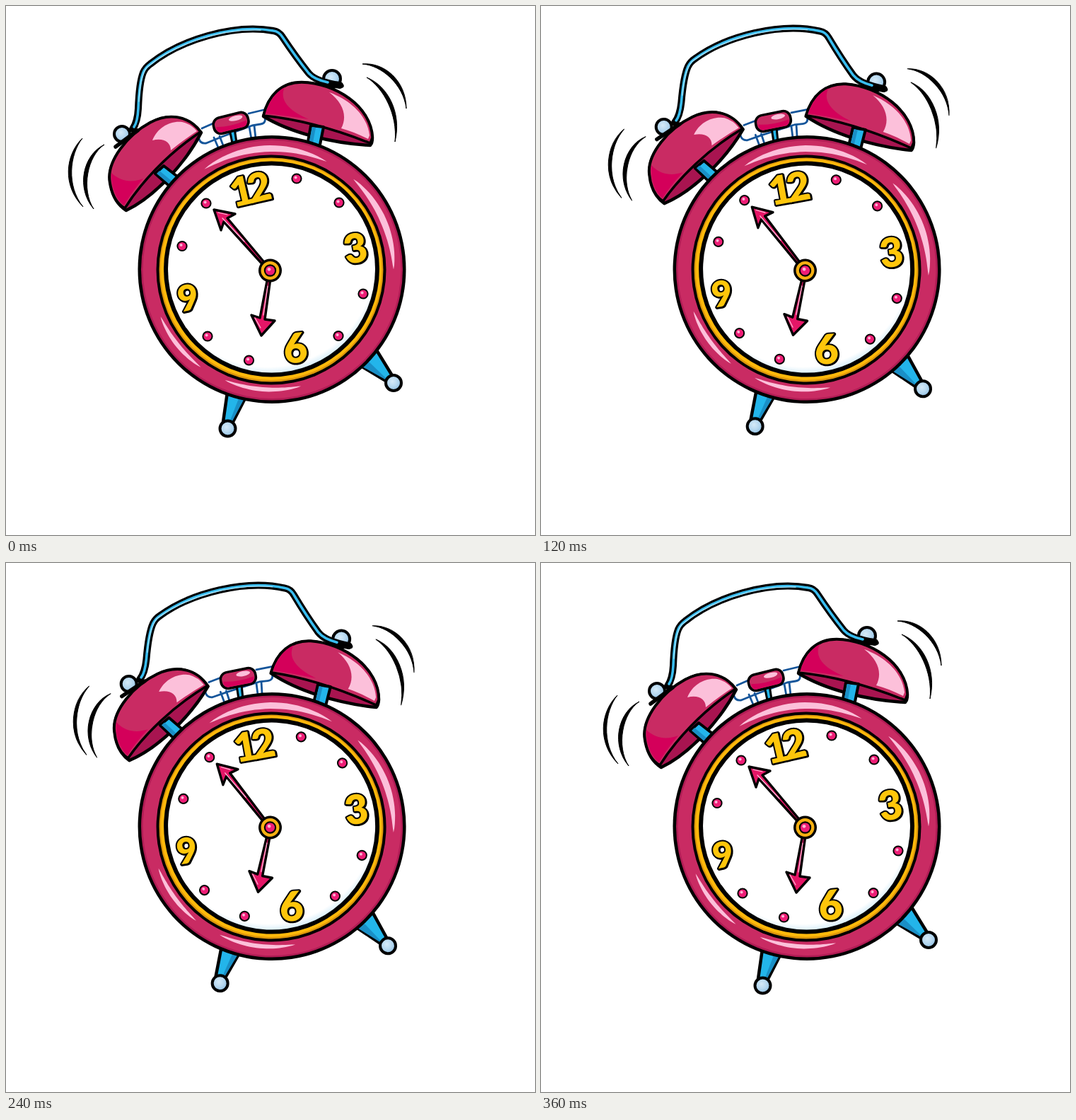
Recreate the animation shown at these times as an HTML page. Size 748 px wide and 748 px high, loop 390 ms.

```html
<!DOCTYPE html>
<html lang="en">
<head>
<meta charset="utf-8">
<title>Ringing alarm clock</title>
<style>
html, body { margin: 0; width: 100%; height: 100%; overflow: hidden; background: #fff; }
svg { display: block; width: 100vw; height: 100vh; }
.ink { stroke: #000; stroke-width: 4.5; stroke-linejoin: round; stroke-linecap: round; }
.line { fill: none; stroke-linecap: round; stroke-linejoin: round; }
.num { font: 900 55px Lato, sans-serif; text-anchor: middle; stroke: #000; stroke-width: 4;
  stroke-linejoin: round; paint-order: stroke; fill: #ffc60b; }
.shade { fill: #000; }
</style>
</head>
<body>
<svg viewBox="0 0 748 748">
<defs>
  <radialGradient id="ball" cx=".42" cy=".4" r=".6">
    <stop offset="0" stop-color="#d5eaf8"/><stop offset=".6" stop-color="#b3d6ef"/><stop offset="1" stop-color="#8dbde0"/>
  </radialGradient>
  <radialGradient id="glass" gradientUnits="userSpaceOnUse" cx="370" cy="358" r="162">
    <stop offset=".94" stop-color="#fff"/><stop offset="1" stop-color="#d9effa"/>
  </radialGradient>
</defs>
<g id="clock">
  <g id="waves"></g>

  <!-- feet -->
  <path class="ink" fill="#23b5ea" d="M497 506L523 485L547 524L537 530Z"/>
  <path fill="#1a8fc6" d="M502 509L511 501L538 527L536 528Z"/>
  <path class="ink" fill="#23b5ea" d="M313 546L340 551L320 590L307 588Z"/>
  <path fill="#1a8fc6" d="M329 555L337 555L320 587L317 586Z"/>

  <!-- hammer frame and button -->
  <g class="line" stroke="#14559a" stroke-width="2.8">
    <path d="M277 173L302 162M343 152L368 146M273 188Q275 195 283 194L305 185L348 169L360 167Q368 166 366 157"/>
    <path d="M294 186L300 200M302 184L307 197M344 171L347 188M351 169L353 187"/>
  </g>
  <path class="ink" fill="#23b5ea" style="stroke-width:3" d="M316 174L323 173L326 193L320 194Z"/>
  <g transform="rotate(-14 318 165)">
    <rect class="ink" style="stroke-width:3.5" x="293" y="154" width="50" height="23" rx="10" fill="#c92b63"/>
    <path fill="#d4005a" d="M296 166Q318 171 340 167Q340 175 334 175H302Q296 175 296 166Z"/>
    <ellipse cx="326" cy="160.5" rx="10" ry="3.5" fill="#fcc0da"/>
  </g>

  <!-- right bell -->
  <path class="ink" fill="#a81450" d="M364 156C371 126 390 108 418 108C466 109 516 142 518 186Q518 194 515 197C460 194 402 179 364 156Z"/>
  <path class="ink" style="stroke-width:3.5" fill="#c92b63" d="M364 155C371 126 390 108 418 108C466 109 516 142 518 186L515 194C475 178 425 161 364 155Z"/>
  <path fill="#d4005a" d="M367 152C371 137 380 122 394 115C386 132 399 148 428 160C408 157 387 154 367 152Z"/>
  <path fill="#fcc0da" d="M457 122C489 134 511 156 514 183L512 188C500 182 488 177 474 173C483 156 477 137 457 122Z"/>

  <!-- left bell -->
  <path class="ink" fill="#a81450" d="M276 179C258 155 230 151 204 165C172 182 142 220 147 249Q151 277 170 289C208 271 253 224 276 179Z"/>
  <path class="ink" style="stroke-width:3.5" fill="#c92b63" d="M275 178C258 155 230 151 204 165C172 182 142 220 147 249Q151 276 168 286C189 252 227 210 275 178Z"/>
  <path fill="#d4005a" d="M149 236C164 250 180 249 194 244Q177 264 167 282C154 272 148 253 149 236Z"/>
  <path fill="#fcc0da" d="M207 190C214 172 232 162 249 164Q262 167 270 177Q250 190 233 204C233 192 222 186 207 190Z"/>

  <!-- bell posts -->
  <path class="ink" style="stroke-width:4" fill="#23b5ea" d="M431 169L449 171L443 201L426 197Z"/>
  <path fill="#1a8fc6" d="M433 171L438 172L433 198L428 196Z"/>
  <path class="ink" style="stroke-width:4" fill="#23b5ea" d="M211 237L223 226L250 247L236 259Z"/>
  <path fill="#1a8fc6" d="M213 237L217 233L241 253L237 257Z"/>

  <!-- knobs and handle -->
  <circle class="ink" style="stroke-width:4" cx="164" cy="181" r="11" fill="url(#ball)"/>
  <circle class="ink" style="stroke-width:4" cx="461" cy="103" r="12" fill="url(#ball)"/>
  <path class="line" stroke="#000" stroke-width="5.5" d="M155 199L186 176M441 105L475 113"/>
  <path class="line" stroke="#000" stroke-width="10" d="M179 174Q186 164 187 145C188 118 190 104 194 94Q197 87 204 82C246 48 322 25 378 35Q386 36 391 44C405 65 420 85 428 95Q438 107 472 112"/>
  <path class="line" stroke="#39bdf0" stroke-width="3.6" d="M181 171Q186 164 187 145C188 118 190 104 194 94Q197 87 204 82C246 48 322 25 378 35Q386 36 391 44C405 65 420 85 428 95Q436 104 455 108"/>
  <path class="line" stroke="#a5e3fb" stroke-width="1.3" d="M188 135C189 112 193 95 199 87C240 53 304 32 360 34"/>

  <g id="balls"></g>

  <!-- body -->
  <circle cx="376" cy="372.5" r="189.5"/>
  <circle cx="376" cy="372.5" r="185" fill="#b11c55"/>
  <circle cx="376" cy="372.5" r="182.5" fill="#c92b63"/>
  <g id="shine" fill="#fcc0da"></g>
  <circle cx="375" cy="373" r="162.5"/>
  <circle cx="375" cy="373" r="158.5" fill="#dc960b"/>
  <circle cx="375" cy="372.5" r="156.5" fill="#ffb90b"/>
  <circle cx="375.5" cy="372" r="152.5"/>
  <circle cx="375.5" cy="372" r="146.5" fill="url(#glass)"/>

  <g id="nums"></g>
  <g id="dots"></g>

  <!-- hands -->
  <g class="ink" style="stroke-width:3.4" fill="#e51667">
    <path d="M294 288L324 294L313 300L369 367L366 369L308 305L304 317Z"/>
    <path d="M361 466L347 437L359 441L370 384L374 385L366 443L380 445Z"/>
  </g>
  <path class="line" stroke="#fcc0da" stroke-width="1.2" d="M300 292L313 295M306 300L337 333M352 441L360 455M364 437L370 396"/>
  <circle cx="373.5" cy="374" r="16.5"/>
  <circle cx="373.5" cy="374" r="13" fill="#f6b012"/>
  <circle cx="373.5" cy="374" r="8.7"/>
  <circle cx="373.5" cy="374" r="6.6" fill="#ee1d76"/>
  <circle cx="372" cy="372.3" r="2.4" fill="#fbb3d3"/>
</g>
</svg>
<script>
const $ = id => document.getElementById(id);
const CX = 376, CY = 372.5;

// Tapered sliver on the rim; angles in degrees, clockwise from the right
function sliver(r, from, to, width) {
  const pt = (u, side) => {
    const a = (from + (to - from) * u) * Math.PI / 180;
    const q = r + side * width / 2 * Math.sin(Math.PI * u) ** .7;
    return (CX + q * Math.cos(a)).toFixed(1) + ' ' + (CY + q * Math.sin(a)).toFixed(1);
  };
  const pts = [];
  for (let i = 0; i <= 24; i++) pts.push(pt(i / 24, 1));
  for (let i = 24; i >= 0; i--) pts.push(pt(i / 24, -1));
  return `<path d="M${pts.join('L')}Z"/>`;
}
$('shine').innerHTML = [
  [171, -124, -63, 9], [172, -48, 0, 9], [171, 126, 157, 6], [170, 76, 113, 6]
].map(s => sliver(...s)).join('');

// Shaking marks: start, two outer controls, end, and belly thickness
const wave = (x0, y0, x1, y1, x2, y2, x3, y3, dx, dy) =>
  `<path stroke="#000" stroke-linejoin="round" d="M${x0} ${y0}C${x1} ${y1} ${x2} ${y2} ${x3} ${y3}C${x2 + dx} ${y2 + dy} ${x1 + dx} ${y1 + dy} ${x0} ${y0}Z"/>`;
$('waves').innerHTML = [
  [504, 82, 535, 79, 566, 106, 566, 145, -4, 5],
  [510, 101, 540, 113, 560, 151, 550, 192, -6, 3],
  [108, 187, 84, 210, 79, 254, 109, 284, 6, 0],
  [139, 196, 108, 211, 99, 258, 124, 287, 7, 1]
].map(w => wave(...w)).join('');

$('balls').innerHTML = [[548, 533], [313.5, 597.5]].map(([x, y]) =>
  `<circle class="ink" style="stroke-width:4" cx="${x}" cy="${y}" r="11" fill="url(#ball)"/>`).join('');

$('dots').innerHTML = [
  [411, 244], [471, 278], [505, 407], [470, 466.5], [343.5, 501], [285, 467], [249, 339.5], [283, 279]
].map(([x, y]) => `<circle cx="${x}" cy="${y}" r="7.6"/>
  <circle cx="${x}" cy="${y}" r="5.6" fill="#ee1d76"/>
  <circle cx="${x - 1.4}" cy="${y - 1.6}" r="2" fill="#fbb3d3"/>`).join('');

const num = (text, x, y, turn, size, gap) => {
  const style = `style="font-size:${size}px;letter-spacing:${gap}px"`;
  const at = (dx, cls) => `<text class="num ${cls}" x="${dx}" y="${size * .36 + dx}" ${style}>${text}</text>`;
  return `<g transform="translate(${x} ${y}) rotate(${turn})">${at(.8, 'shade')}${at(0, '')}</g>`;
};
$('nums').innerHTML = [
  ['12', 342, 259.5, -13, 56, -7], ['3', 494, 342.5, -10, 57, 0],
  ['6', 409, 483.5, -6, 58, 0], ['9', 257.5, 412.5, -12, 50, 0]
].map(n => num(...n)).join('');

const STEP = 30, STEPS = 13, TURN = 1.4;
function draw(t) {
  const k = Math.floor(t / STEP) % STEPS;
  const swing = 3 - Math.abs(3 - k % 6);
  $('clock').setAttribute('transform', `rotate(${swing * TURN} 374 374)`);
}
const start = performance.now();
function tick() {
  draw(performance.now() - start);
  requestAnimationFrame(tick);
}
draw(0);
requestAnimationFrame(tick);
</script>
</body>
</html>
```
